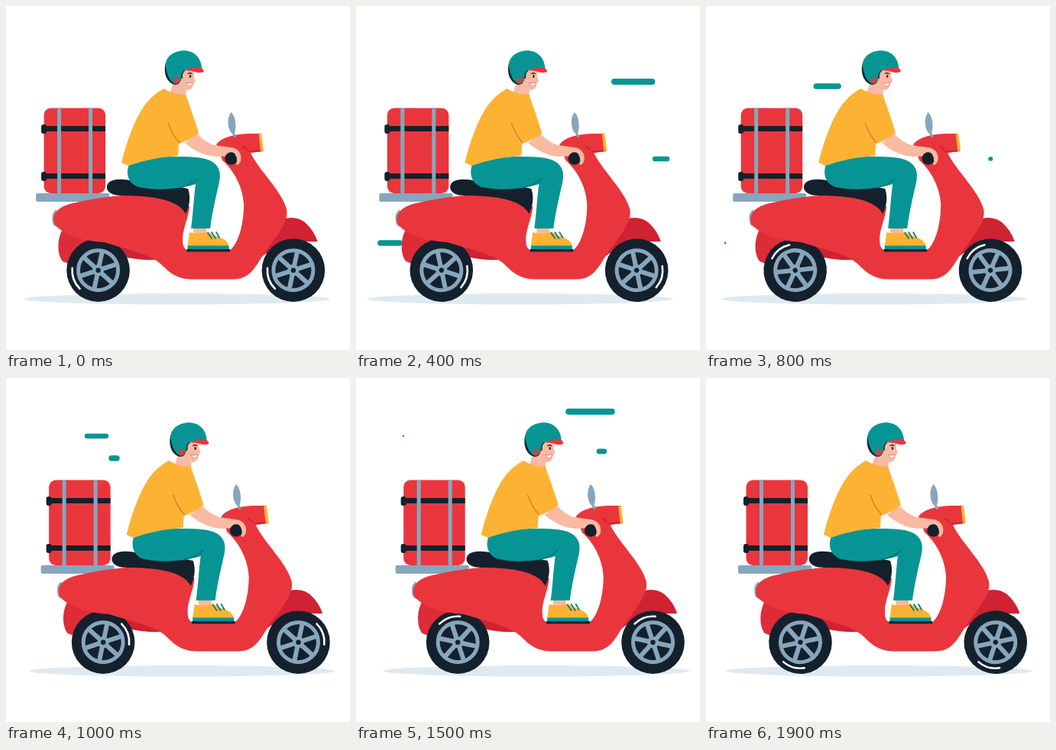
Write an HTML page that moves like this. It is 450 px wide and 450 px high and loops after 2 s.

```html
<!DOCTYPE html>
<html lang="en">
<head>
<meta charset="utf-8">
<title>Scooter delivery</title>
<style>
html, body { margin: 0; width: 100%; height: 100%; overflow: hidden; background: #fff; }
svg { display: block; width: 100vw; height: 100vh; }
.red { fill: #e9363d; }
.deep { fill: #cf2232; }
.teal { fill: #069594; }
.navy { fill: #14212d; }
.steel { fill: #87a6bc; }
.sun { fill: #fcb334; }
.skin { fill: #fab9a2; }
.line { fill: none; stroke-linecap: round; stroke-linejoin: round; }
</style>
</head>
<body>
<svg viewBox="0 0 450 450" xmlns="http://www.w3.org/2000/svg">
  <defs>
    <g id="wheel">
      <circle class="navy" r="41.3"/>
      <circle class="line" r="26" stroke="#87a6bc" stroke-width="5"/>
      <path class="line" id="spokes" stroke="#87a6bc" stroke-width="6"/>
      <circle class="steel" r="7.5"/>
      <circle class="navy" r="3.2"/>
      <path class="line" id="shine" stroke="#fff" stroke-width="2.6"/>
    </g>
  </defs>

  <g id="streaks" class="line" stroke="#069594"></g>

  <g id="ride">
    <ellipse cx="223.5" cy="383.3" rx="200.5" ry="7.3" fill="#dfe9f0"/>

    <!-- luggage -->
    <rect class="steel" x="39" y="245" width="96" height="11" rx="2"/>
    <rect class="red" x="49.500" y="133.500" width="80.500" height="111.500" rx="9"/>
    <path class="navy" d="M49 157H130V164H49ZM49 219H130V226H49Z"/>
    <rect class="navy" x="46" y="155" width="7" height="12" rx="3"/>
    <rect class="navy" x="46" y="217" width="7" height="12" rx="3"/>
    <path class="steel" d="M67 133.500H72V245H67ZM108 133.500H113V245H108Z"/>

    <!-- fenders and wheels -->
    <path fill="#dc2c38" d="M74 292C66 306 67 326 74 334L84 338L120 300Z"/>
    <path class="deep" d="M120 300L190 305L210 331Q180 334 158 329Z"/>
    <path class="deep" d="M352 286C362 275 380 274 391 283Q403 294 407.500 308Q393 309 380 307Q352 311 325 336Z"/>
    <use class="wheel" href="#wheel" data-x="120.500"/>
    <use class="wheel" href="#wheel" data-x="375.800"/>

    <!-- body -->
    <path class="steel" d="M66 266Q59 270 60.500 281Q61 288 67 289Z"/>
    <path class="red" d="M63 285C59 270 70 261 92 257C128 249 165 245 200 248L240 262
      C239 278 230 292 231 308Q231 319 240 320H292C304 312 311 285 311 260
      C310 236 297 214 283 202L275 181C283 171 298 168 316 167L331 167L335 190L320 192
      C329 213 361 242 367 266C371 284 349 306 334 329C324 346 316 357 298 357.500H242
      C222 357 212 347 203 338C190 325 160 319 128 309Q80 306 63 285Z"/>
    <path class="deep" d="M307 183L335 186L336 190L319 192Z"/>
    <path class="red" d="M306 172L332 166.500L336 188L317 190Z"/>
    <path class="sun" d="M330.500 167L334 166.500L337 189L333 190Z"/>
    <path class="steel" d="M294.500 139C300 144 302 157 299 166L301 171L298 172L296 167C290 162 288 147 294.500 139Z"/>
    <path class="navy" d="M132 239C130 228 145 224 166 229C195 238 220 234 238 239C242 250 240 262 235 272C226 254 194 248 152 248Q135 248 132 239Z"/>

    <!-- legs -->
    <path class="skin" d="M245 288H262V300H245Z"/>
    <path class="sun" d="M240 296Q252 300 265 295C271 303 289 301 291.500 314H237.500Z"/>
    <path class="teal" d="M237.500 313.500H291.500V318H237.500Z"/>
    <path class="navy" d="M236.500 318H293V321.500H236.500Z"/>
    <path class="line" stroke="#06807f" stroke-width="1.800" d="M264 297L269 304M269 296L274 304M275 296L279 303"/>
    <path class="teal" d="M161 207C185 196 225 196 249 198C274 200 283 212 279 230C273 256 269 274 267 291H242
      C245 268 246 246 248 233C222 241 192 241 174 237C160 233 156 219 161 207Z"/>
    <path class="line" stroke="#05706f" stroke-width="1.600" d="M251 226Q243 234 226 238"/>

    <!-- arm, torso -->
    <path class="skin" d="M234 179L250 167Q260 178 272 182L294 185C304 186 309 194 307 202Q304 210 301 207Q303 199 297 195Q285 197 274 197Q252 195 234 179Z"/>
    <circle class="navy" cx="294.500" cy="199.500" r="8.300"/>
    <path class="line" stroke="#fab9a2" stroke-width="5" d="M296 188Q304 191 304.500 202"/>
    <path class="skin" d="M220 96L235 104L236 120L214 114Z"/>
    <path class="sun" d="M206 108Q222 117 235 116Q243 138 252 166Q240 176 226 180L225 196Q190 198 160 209L151 205C159 174 170 142 186 124Q194 115 206 108Z"/>
    <path class="line" stroke="#d9832b" stroke-width="1.600" d="M212 153Q218 170 227 179"/>

    <!-- head -->
    <path class="skin" d="M226 84L246 84L246 93L248 98L245 101C245 109 239 111 233 110L220 103Z"/>
    <path fill="#3a2528" d="M226 84H235Q230 87 231 94L226 98Z"/>
    <path class="navy" d="M209 74C205 86 210 102 222 103Q228 102 229 95L226 82Z"/>
    <path class="teal" d="M209 81C206 66 222 57 236 58.500C249 60 256 71 256 82L233 84Q229 86 229 95Q227 102 222 102C214 99 211 91 209 81Z"/>
    <path fill="#e9363d" d="M234 84Q246 79 256 81L259 85Q257 88 250 87Q242 84 234 84Z"/>
    <circle class="red" cx="223" cy="97" r="3.700"/>
    <ellipse class="navy" cx="241" cy="92" rx="1.200" ry="1.900"/>
    <path class="line" stroke="#3a2528" stroke-width="1.300" d="M238 88.500Q241 87 243 88.500"/>
    <path fill="#fff" stroke="#c9505a" stroke-width=".6" d="M235.500 100.500Q240 102 244.500 100Q243 105 239.500 105Q237 104 235.500 100.500Z"/>
  </g>
</svg>
<script>
const LOOP = 2000, STEP = 100, AXLE = 345.7;
const $ = id => document.getElementById(id);
const clamp = v => Math.min(1, Math.max(0, v));
const mod = (a, n) => ((a % n) + n) % n;
const easeSine = p => (1 - Math.cos(Math.PI * clamp(p))) / 2;
const easeOut = p => 1 - (1 - clamp(p)) ** 3;
const polar = (r, deg) => {
  const a = deg * Math.PI / 180;
  return `${(r * Math.cos(a)).toFixed(2)} ${(r * Math.sin(a)).toFixed(2)}`;
};

// Wind streaks: start time, height, right end, left end
const streaks = [
  [60, 99, 409, 338], [240, 200, 407, 372], [165, 310, 57, 25],
  [555, 105, 173, 138], [860, 76, 131, 62], [1010, 96, 389, 318],
  [1190, 44, 340, 277]
].map(([start, y, from, to]) => {
  const el = document.createElementNS('http://www.w3.org/2000/svg', 'path');
  $('streaks').append(el);
  return { start, y, from, to, el };
});

$('spokes').setAttribute('d', [0, 60, 120, 180, 240, 300]
  .map(a => `M0 0L${polar(25, a + 42)}`).join(''));
$('shine').setAttribute('d', `M${polar(34, 135)}A34 34 0 0 1 ${polar(34, 185)}`);
const wheels = [...document.querySelectorAll('.wheel')];

// Drift back slowly, then surge forward
function sway(t) {
  const u = mod(t - 570, LOOP);
  const p = u < 700 ? easeSine(u / 700) : 1 - easeSine((u - 700) / 1300);
  return -9.7 + 24.2 * p;
}

function drawStreak({ start, y, from, to, el }, t) {
  const life = 660, u = t - start;
  const on = u > 0 && u < life;
  el.setAttribute('visibility', on ? 'visible' : 'hidden');
  if (!on) return;
  const at = p => (from + (to - from) * p).toFixed(2);
  el.setAttribute('d', `M${at(easeOut((u - 300) / 350))} ${y}L${at(easeSine(u / 340))} ${y}`);
  el.setAttribute('stroke-width', 8 * Math.sqrt(Math.sin(Math.PI * u / life)));
}

function draw(t) {
  $('ride').setAttribute('transform', `translate(${sway(t).toFixed(2)} 0)`);
  const turn = t / LOOP * 1080;
  for (const w of wheels)
    w.setAttribute('transform', `translate(${w.dataset.x} ${AXLE}) rotate(${turn})`);
  for (const s of streaks) drawStreak(s, t);
}

function tick() {
  draw(Math.floor(performance.now() % LOOP / STEP) * STEP);
  requestAnimationFrame(tick);
}
tick();
</script>
</body>
</html>
```
